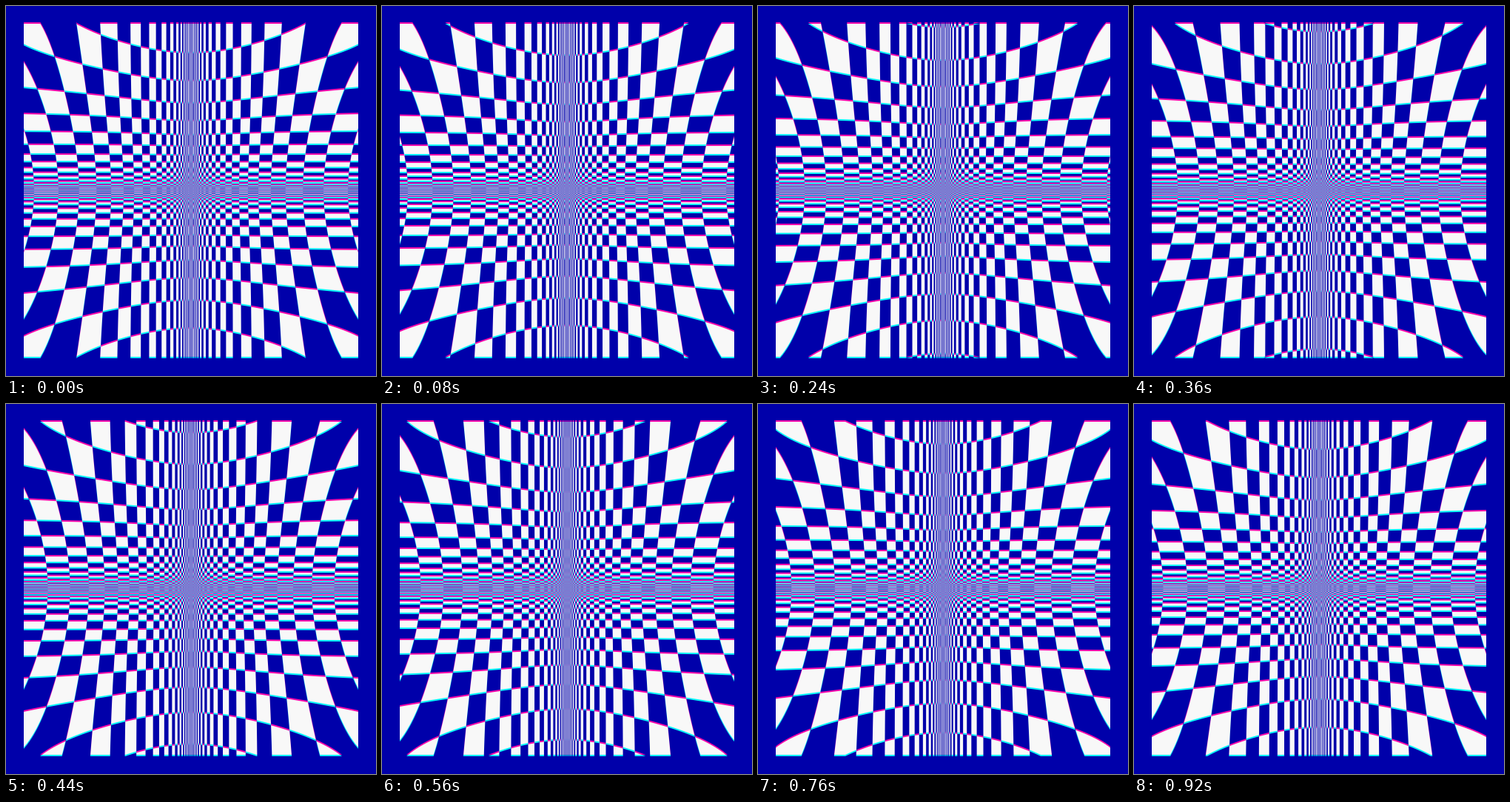
Recreate the animation shown at these times as an HTML page with a canvas. Size 500 by 500 pixels, loop 0.96 s.

```html
<!DOCTYPE html>
<html lang="en">
<head>
<meta charset="utf-8">
<title>Flowing checker</title>
<style>
  html, body { margin: 0; height: 100%; overflow: hidden; background: #0000aa; }
  canvas { display: block; }
</style>
</head>
<body>
<canvas id="stage" width="500" height="500"></canvas>
<script>
const ctx = document.getElementById('stage').getContext('2d');
const LOOP = 960, STEP = 40;
const HALF = 226, SIZE = 2 * HALF, SHIFT = 2;
const COLUMN = { pitch: 0.169, start: 5.019 };
const ROW = { pitch: 0.2265, start: 5 };

// Logarithmic grid on a square squeezed into a disc (squircle mapping).
function gridAt({ pitch, start }, main, cross) {
  const a = main * main, b = cross * cross;
  const squeeze = 1 - a * b / ((a + b) * HALF * HALF);
  return (Math.log(main) + Math.log(squeeze) / 2 - start) / pitch;
}

// Grid coordinate and its change per pixel, for smooth edges.
function sample(axis, main, cross) {
  const n = gridAt(axis, main, cross);
  const dMain = gridAt(axis, main + 0.5, cross) - n;
  const dCross = gridAt(axis, main, cross + 0.5) - n;
  return { n, width: 2 * Math.hypot(dMain, dCross) };
}

// One quadrant is enough: the picture is mirrored on both axes.
const cols = [], rows = [];
for (let y = 0.5; y < HALF; y++) {
  for (let x = 0.5; x < HALF; x++) {
    cols.push(sample(COLUMN, x, y));
    rows.push(sample(ROW, y, x));
  }
}

const cover = new Float32Array(HALF * HALF);
const image = ctx.createImageData(SIZE, SIZE + SHIFT);

function wave({ n, width }, phase) {
  const s = 2 * Math.sin(Math.PI * (n + phase)) / (Math.PI * width);
  return Math.max(-1, Math.min(1, s));
}

function coverAt(x, y) {
  if (y < 0 || y >= SIZE) return 0;
  const qx = x < HALF ? HALF - 1 - x : x - HALF;
  const qy = y < HALF ? HALF - 1 - y : y - HALF;
  return cover[qy * HALF + qx];
}

// Columns flow outwards while rows flow inwards, one cell per loop.
function draw(phase) {
  for (let i = 0; i < cover.length; i++) {
    cover[i] = (1 + wave(cols[i], -phase) * wave(rows[i], phase)) / 2;
  }
  let i = 0;
  for (let y = 0; y < SIZE + SHIFT; y++) {
    for (let x = 0; x < SIZE; x++) {
      const red = coverAt(x, y), cyan = coverAt(x, y - SHIFT);
      image.data[i++] = 248 * red;
      image.data[i++] = 248 * cyan;
      image.data[i++] = 170 + 78 * cyan;
      image.data[i++] = 255;
    }
  }
  ctx.putImageData(image, 250 - HALF, 250 - HALF - SHIFT);
}

let shown = -1;
function tick() {
  const step = Math.floor(performance.now() % LOOP / STEP);
  if (step !== shown) draw(step * STEP / LOOP);
  shown = step;
  requestAnimationFrame(tick);
}
tick();
</script>
</body>
</html>
```
